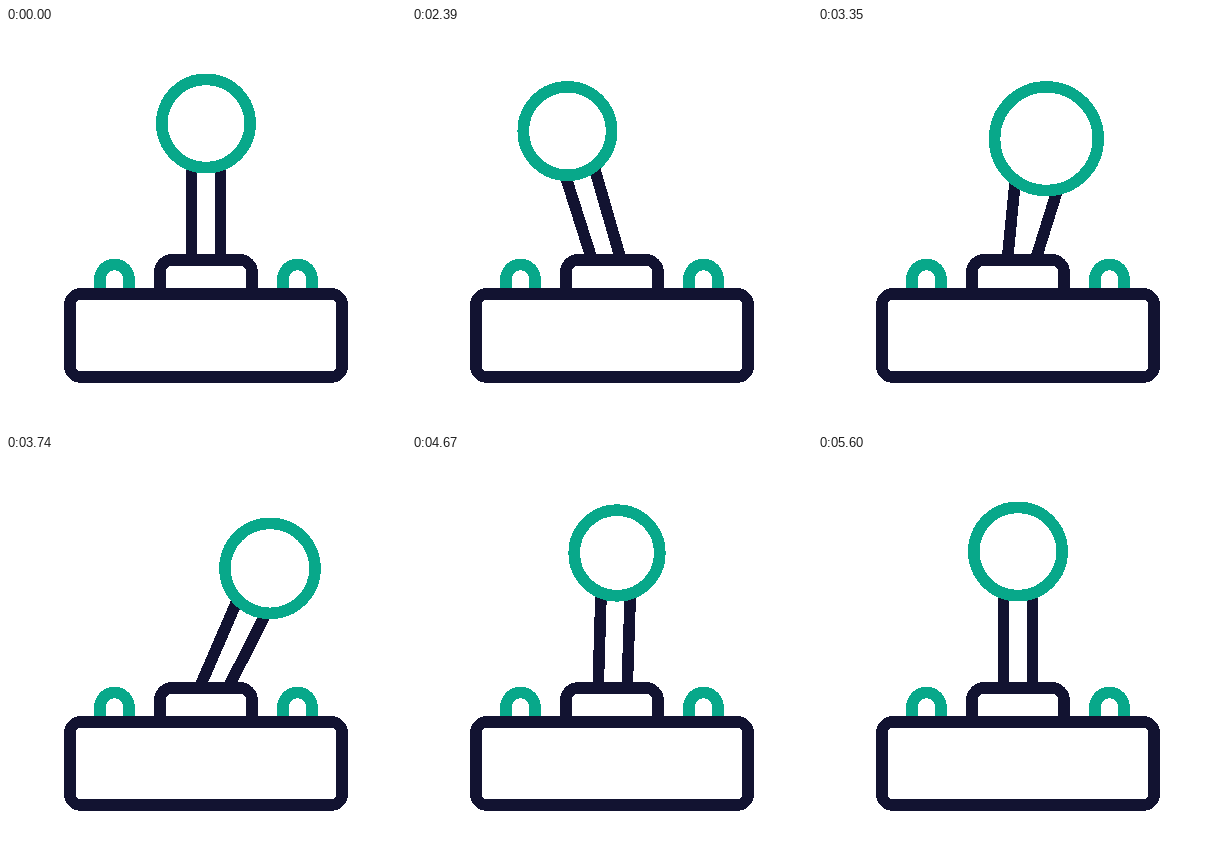
These frames come from a looping animation (400 px wide and 400 px high, 5630 ms). An HTML page:

```html
<!DOCTYPE html>
<html lang="en">
<head>
<meta charset="utf-8">
<title>Joystick</title>
<style>
  html, body { margin: 0; width: 100%; height: 100%; overflow: hidden; background: #fff; }
  svg { display: block; width: 100%; height: 100%; fill: #fff; stroke: #121331; stroke-width: 11.6; shape-rendering: crispEdges; }
  .green { stroke: #08a88a; }
</style>
</head>
<body>
<svg viewBox="0 0 400 400">
  <path id="stick"/>
  <circle id="ball" class="green"/>
  <path class="green" d="M94 261V251a14.5 14.5 0 0 1 29 0V261M277 261V251a14.5 14.5 0 0 1 29 0V261"/>
  <path d="M154 266V244a12 12 0 0 1 12-12h68a12 12 0 0 1 12 12V266"/>
  <rect x="63.8" y="266" width="272.4" height="83" rx="11"/>
</svg>
<script>
const LOOP = 5630, HOLD = 2030, STEP = 30;

// Eased moves: start, end, change
const swing = [
  [2000, 2600, -62], [2720, 3690, 126], [3860, 5000, -74],
  [5000, 5240, 20], [5240, 5500, -12], [5500, 5600, 2]
];
const approach = [
  [2680, 3200, 9.4], [3200, 3700, -8.4], [3700, 4220, -11.2], [4240, 4800, 10.2]
];

function ease(u) {
  u = Math.min(1, Math.max(0, u));
  return u * u * (3 - 2 * u);
}

const total = (moves, t) =>
  moves.reduce((sum, [start, end, change]) => sum + change * ease((t - start) / (end - start)), 0);

const stick = document.getElementById('stick');
const ball = document.getElementById('ball');

function draw() {
  const now = performance.now() % LOOP;
  const t = now < HOLD ? 0 : now - (now - HOLD) % STEP;
  const side = total(swing, t), near = total(approach, t);

  // Leaning any way lowers the ball, most of all towards the viewer
  const drop = 0.0038 * side * side + 1.3 * Math.abs(near) + 0.3 * near;
  const x = 200 + side, y = 95.5 + drop;

  // Perspective spreads the top of the stick as the ball comes nearer
  const tilt = Math.min(1, drop / 15);
  const half = 14.5 + tilt * (3.5 + near + 0.025 * near * near);
  const foot = 200 + 0.15 * side;

  stick.setAttribute('d', [-1, 1].map(s => `M${foot + s * 14.5} 228L${x + s * half} ${y}`).join(''));
  ball.setAttribute('cx', x);
  ball.setAttribute('cy', y);
  ball.setAttribute('r', 44.2 + near);
  requestAnimationFrame(draw);
}
draw();
</script>
</body>
</html>
```
